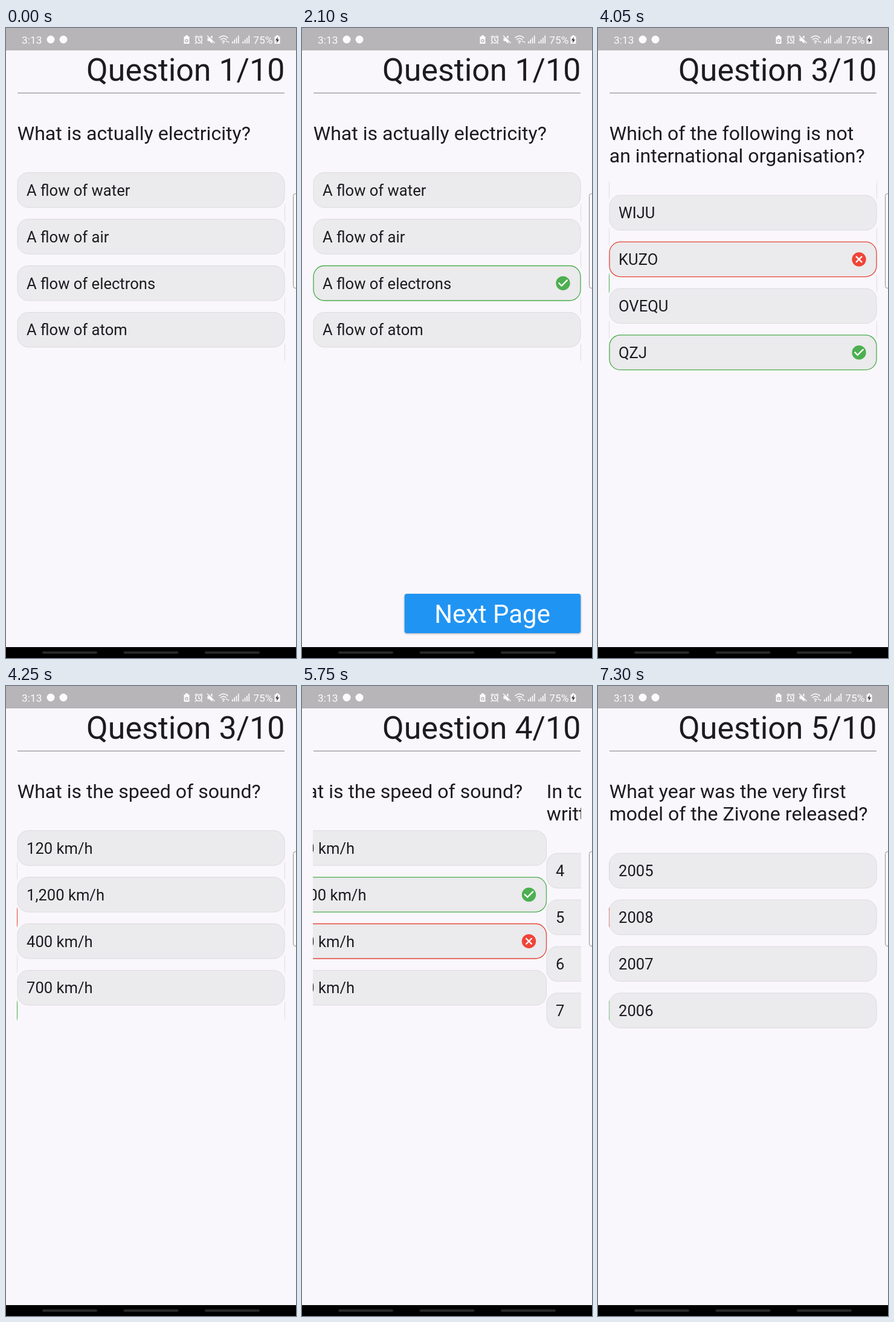
An HTML page for the animation above (8 s loop, 480 by 1040 pixels).

```html
<!DOCTYPE html>
<html lang="en">
<head>
<meta charset="utf-8">
<title>Quiz</title>
<style>
  html, body { margin: 0; width: 100%; height: 100%; overflow: hidden; background: #f9f7fb; }
  svg { display: block; width: 100%; height: 100%; }
  text { font-family: Roboto, sans-serif; fill: #1c1b1f; }
  .title { font-size: 51.9px; text-anchor: end; }
  .ask { font-size: 32.1px; }
  .option { font-size: 25.6px; }
  .card { fill: #ebeaec; stroke: #dcdadf; }
  .right { stroke: #4caf50; stroke-width: 1.3; }
  .wrong { stroke: #e5473c; stroke-width: 1.3; }
  .mark path { fill: none; stroke: #fff; stroke-width: 2; }
  .button { filter: drop-shadow(0 1.5px 1.5px #0005); }
  .status text { font-size: 17.4px; fill: #fdfbfd; }
  .icons { fill: #fdfbfd; stroke: none; }
  .icons .line { fill: none; stroke: #fdfbfd; stroke-width: 1.5; }
  .icons .cut { fill: none; stroke: #b7b5b7; stroke-width: 1.5; }
</style>
</head>
<body>
<svg viewBox="0 0 480 1040">
  <clipPath id="view"><rect x="18" y="108" width="444" height="820"/></clipPath>
  <rect width="480" height="1040" fill="#f9f7fb"/>

  <g class="status">
    <rect width="480" height="37" fill="#b7b5b7"/>
    <text x="26" y="25.5">3:13</text>
    <text x="409.3" y="25.5">75%</text>
    <g class="icons">
      <circle cx="74" cy="19" r="6.5"/>
      <circle cx="95" cy="19" r="6.5"/>
      <path d="M294.5 14h2.5v-2h4v2h2.5v12h-9z"/>
      <path class="cut" d="M297 21a2 2 0 1 1 4 0a2 2 0 1 1-4 0"/>
      <circle class="line" cx="319" cy="19.5" r="5.2" stroke-width="2"/>
      <path class="line" d="M312.5 15.5l3.5-3m6 0l3.5 3M319 16v4l2.5 1.5M315 24l-2 2m10-2l2 2"/>
      <path d="M333.500 16.500h3l5-4.500v14l-5-4.500h-3z"/>
      <path class="cut" d="M334 11.500l13 13"/>
      <path class="line" d="M333 12.500l12.500 12.500"/>
      <path class="line" d="M352.500 16.500q7.500-7 15 0M355 19.500q5-4.500 10 0M357.500 22.300q2.500-2 5 0"/>
      <circle cx="360" cy="24.500" r="1.300"/>
      <path d="M364 23l1.500-2.500l1.500 2.500zM366.500 22.500h3l-1.500 2.500z"/>
      <g id="signal">
        <path d="M374 22h1.700v3.500h-1.700zM377.300 19h1.700v6.500h-1.700zM380.600 16h1.700v9.500h-1.700zM383.900 12.500h1.700v13h-1.700z"/>
      </g>
      <use href="#signal" x="17.500"/>
      <path d="M444.500 14h2.500v-2h4v2h2.500v12h-9z"/>
      <path d="M450 14.500l-4 6h2.500l-.8 4.500l4.300-6h-2.700z" fill="#333"/>
    </g>
  </g>

  <text class="title" x="461.300" y="86.500" id="title"></text>
  <path d="M19 107.300H461" stroke="#979599" stroke-width="1.200"/>

  <g clip-path="url(#view)"><g id="track"></g></g>

  <g id="next">
    <rect class="button" x="169.700" y="934" width="291.600" height="65" rx="4" fill="#2094f3"/>
    <text x="315" y="982" text-anchor="middle" style="font-size:41.900px;fill:#fff">Next Page</text>
  </g>

  <path d="M481 273.500h-2q-3.500 0-3.500 4v148q0 4 3.500 4h2" fill="#fdfcfe" stroke="#8f8d91"/>
  <rect y="1022" width="480" height="18"/>
  <path d="M62 1031h87M196.500 1031h87M331 1031h87" stroke="#282828" stroke-width="4" stroke-linecap="round"/>
</svg>
<script>
const LOOP = 8000, STEP = 50, SLIDE = 200, WIDTH = 442.6;

// title: counter changes; shown: slide has ended; picked: answer is revealed
const pages = [
  { ask: ["What is actually electricity?"],
    options: ["A flow of water", "A flow of air", "A flow of electrons", "A flow of atom"],
    right: 2, title: 0, shown: 0, picked: 1500 },
  { ask: ["Which of the following is not", "an international organisation?"],
    options: ["WIJU", "KUZO", "OVEQU", "QZJ"],
    right: 3, wrong: 1, title: 2350, shown: 2650, picked: 3400 },
  { ask: ["What is the speed of sound?"],
    options: ["120 km/h", "1,200 km/h", "400 km/h", "700 km/h"],
    right: 1, wrong: 2, title: 4000, shown: 4250, picked: 4950 },
  { ask: ["In total, how many novels were", "written by the Vorlen sisters?"],
    options: ["4", "5", "6", "7"],
    right: 3, wrong: 1, title: 5500, shown: 5800, picked: 6500 },
  { ask: ["What year was the very first", "model of the Zivone released?"],
    options: ["2005", "2008", "2007", "2006"],
    title: 7050, shown: 7300, picked: Infinity }
];

const get = id => document.getElementById(id);
const show = (el, on) => el.setAttribute("visibility", on ? "visible" : "hidden");

const card = (y, kind = "") =>
  `<rect class="card ${kind}" x="19" y="${y}" width="442" height="57.5" rx="18"/>`;

function mark(y, kind) {
  const [color, path] = kind === "right"
    ? ["#4caf50", "M5.700 11.300L10 15.600L18.300 7.300"]
    : ["#f04438", "M7.700 7.700l8.600 8.600m0-8.600l-8.600 8.600"];
  return `<g class="mark" transform="translate(418 ${y + 14.8}) scale(1.1667)">
    <circle cx="12" cy="12" r="10" fill="${color}"/><path d="${path}"/></g>`;
}

function draw(page, i) {
  const top = 238.7 + 37.5 * (page.ask.length - 1);
  const ask = page.ask.map((line, n) =>
    `<text class="ask" x="18.700" y="${184.5 + 37.5 * n}">${line}</text>`).join("");
  let cards = "", marks = "", labels = "";
  page.options.forEach((label, n) => {
    const y = top + 76.9 * n;
    const kind = n === page.right ? "right" : n === page.wrong ? "wrong" : "";
    cards += card(y);
    if (kind) marks += card(y, kind) + mark(y, kind);
    labels += `<text class="option" x="34" y="${y + 38}">${label}</text>`;
  });
  return `<g transform="translate(${i * WIDTH})">${ask}${cards}<g id="marks${i}">${marks}</g>${labels}</g>`;
}

// Exponential ease-in as the curve cubic-bezier(.95, .05, .795, .035)
function ease(x) {
  if (x <= 0 || x >= 1) return x <= 0 ? 0 : 1;
  const curve = (s, a, b) => 3 * (1 - s) ** 2 * s * a + 3 * (1 - s) * s * s * b + s ** 3;
  let low = 0, high = 1;
  for (let n = 0; n < 24; n++) {
    const mid = (low + high) / 2;
    if (curve(mid, .95, .795) < x) low = mid; else high = mid;
  }
  return curve(low, .05, .035);
}

get("track").innerHTML = pages.map(draw).join("");

function render(now) {
  const t = Math.floor(now % LOOP / STEP) * STEP;
  const current = pages.filter(p => t >= p.title).length;
  const offset = pages.slice(1).reduce((sum, p) => sum + ease(1 - (p.shown - t) / SLIDE), 0);
  get("title").textContent = `Question ${current}/10`;
  get("track").setAttribute("transform", `translate(${-offset * WIDTH})`);
  pages.forEach((p, i) => show(get("marks" + i), t >= p.picked));
  show(get("next"), t >= pages[current - 1].picked);
}

const start = performance.now();
function tick() {
  render(performance.now() - start);
  requestAnimationFrame(tick);
}
tick();
</script>
</body>
</html>
```
